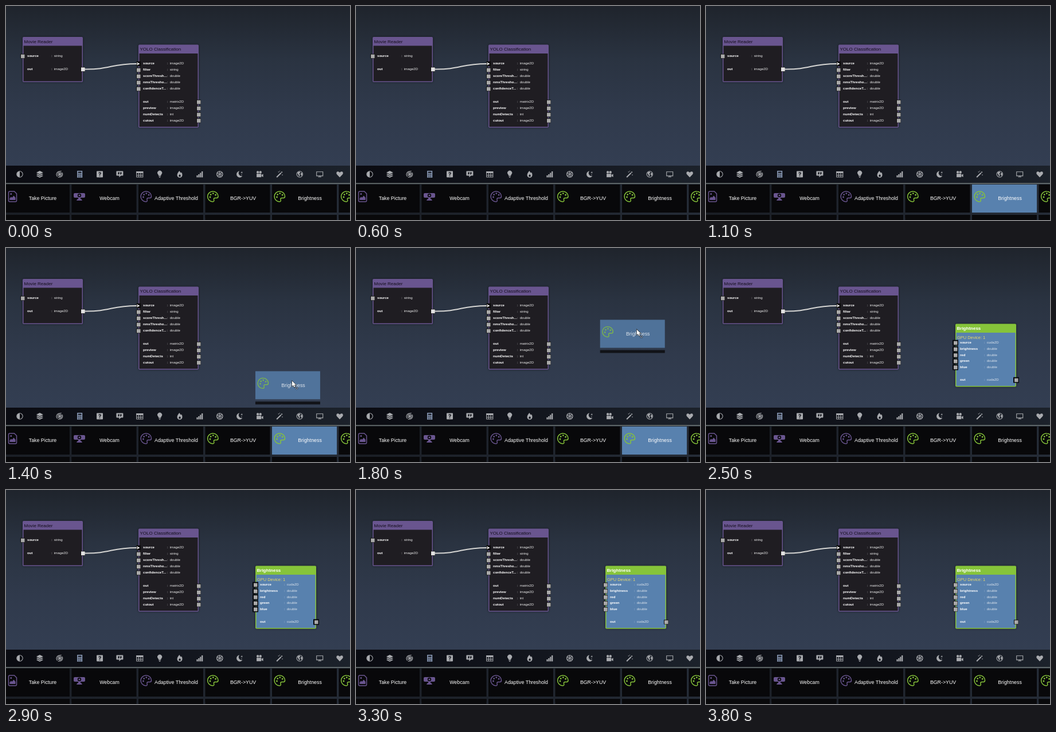
An HTML page with a canvas for the animation above (3900 ms loop, 600 px wide and 374 px high).

```html
<!DOCTYPE html>
<html>
<head>
<meta charset="utf-8">
<style>
html, body { margin: 0; width: 100%; height: 100%; overflow: hidden; background: #1d232c; }
canvas { display: block; }
</style>
</head>
<body>
<canvas id="stage" width="600" height="374"></canvas>
<script>
const ctx = document.getElementById('stage').getContext('2d');
const LOOP = 3900, GRAB = 1100, DRAG = 1200, DROP = 2400, DESELECT = 3300;
const PURPLE = '#69558f', GREEN = '#86c43a', BLUE = '#5881ae';

const dot = (x, y, r) => `M${x - r} ${y}a${r} ${r} 0 1 0 ${2 * r} 0a${r} ${r} 0 1 0 ${-2 * r} 0z`;
const box = (x, y, w, h) => `M${x} ${y}h${w}v${h}h${-w}z`;
const grid = (xs, ys, s) => xs.map(x => ys.map(y => box(x, y, s, s)).join('')).join('');

// Toolbar icons: [filled path, stroked path], centred on 0,0
const toolbar = [
  ['M0-5A5 5 0 0 0 0 5z', dot(0, 0, 5.2)],
  ['M0-6L6-3L0 0L-6-3zM-6 0L-4-1L0 1L4-1L6 0L0 3zM-6 3L-4 2L0 4L4 2L6 3L0 6z', ''],
  [dot(0, 0, 2), 'M-4 4A5 5 0 0 1-2-4.6L3-5.5M4-3A5 5 0 0 1 2 4.6L-3 5.5' + dot(0, 0, 3.2)],
  [box(-4.5, -6, 9, 12) + box(-3, -4.5, 6, 2.2) + grid([-3, -.8, 1.4], [-1, 1.4, 3.8], 1.4), ''],
  ['M-4.5-5.5h9q1 0 1 1v9q0 1-1 1h-9q-1 0-1-1v-9q0-1 1-1z' +
    'M-2.2-1.5Q-2-3.8 0-3.8Q2.4-3.8 2.4-1.8Q2.4-.6.7.4V1.4H-.7V-.3Q1-1 1-1.8Q1-2.6 0-2.6Q-.8-2.6-.9-1.5z' + box(-.7, 2.4, 1.4, 1.4), ''],
  ['M-5-5.5h10q1 0 1 1v6q0 1-1 1h-3L-1 5.5V2.5h-4q-1 0-1-1v-6q0-1 1-1zM-3-3.5h2.4v2.5L-2 .5h-1zM.8-3.5h2.4v2.5L1.8.5h-1z', ''],
  [box(-6, -5, 12, 3), box(-5.5, -4.5, 11, 9.5) + 'M-5 1.7H5M-1.8-2V5M1.8-2V5'],
  ['M-2 2.7Q-2 1.5-3 .3A4 4 0 1 1 3 .3Q2 1.5 2 2.7z' + box(-1.8, 3.4, 3.6, 1) + 'M-1.4 4.9h2.8L.6 6h-1.2z', ''],
  ['M-.5-6Q.5-3.5 2-2.2L3-3.5Q4.7-1 4.5 1.5A4.5 4.5 0 0 1-4.5 1.5Q-4.5-2-.5-6zM0 0Q-2 2-1.8 3.2A1.9 1.9 0 0 0 1.8 3.2Q2 2 0 0z', ''],
  [box(-5.5, 2, 2.2, 3.5) + box(-2.6, 0, 2.2, 5.5) + box(.3, -2.5, 2.2, 8) + box(3.2, -5, 2.2, 10.5), ''],
  [dot(0, 0, 1.2), dot(0, 0, 5.3) + [0, 1, 2, 3, 4, 5].map(i => {
    const p = (r, a) => `${(r * Math.cos(a)).toFixed(2)} ${(r * Math.sin(a)).toFixed(2)}`;
    return `M${p(1.2, i * 1.047)}Q${p(3.5, i * 1.047 - .3)} ${p(5.2, i * 1.047 + .7)}`;
  }).join('')],
  ['M-.5-5.5A5.6 5.6 0 1 0 4.8 3A5.2 5.2 0 0 1-.5-5.5zM3.5-5l.6 1.4 1.4.6-1.4.6-.6 1.4-.6-1.4-1.4-.6 1.4-.6z' + dot(3.2, 1, .7), ''],
  [dot(-3.4, -3.6, 2.2) + dot(1.2, -3.6, 2.2) + box(-5.5, -.8, 8.2, 6) + 'M3.3 1L6-.6V5L3.3 3.4z', ''],
  ['M-6 4.6L1.6-3L3-1.6L-4.6 6zM2.2-3.6L3.6-5L5-3.6L3.6-2.2z' + dot(-2, -4, .8) + dot(4.6, 1.2, .8) + dot(0, -5.3, .6), ''],
  ['M-4-2Q-2.5-5 0-4.6L1-3L-1-1L.5.5L-.5 4Q-2 3-2.2 1zM2-2.5L4.3-2Q5.2 1 3 3L1.6.3z', dot(0, 0, 5.2)],
  [box(-2.5, 4, 5, 1.2) + box(-.8, 3, 1.6, 1.5), box(-5.5, -4.3, 11, 7.2)],
  ['M0 5.4L-5.2 0Q-6.6-2-5-4.2Q-2.5-6 0-3Q2.5-6 5-4.2Q6.6-2 5.2 0z', '']
];

const palette = [dot(-5, 1, 1.4) + dot(-3.8, -3.4, 1.4) + dot(.3, -5.4, 1.4) + dot(4.6, -2.8, 1.4),
  'M0-9A9 9 0 1 0-.8 9Q2.6 9 1.6 5.6Q.6 2.6 4 2.4L7 2.5Q9 2.2 9-.2A9 9 0 0 0 0-9z'];
const picture = ['M-5 6V3L-2.5 .5L-1 2L2 -1.5L5 2V6z' + dot(-2.7, -4.5, 1.5),
  'M-5-9H3L7-5V7Q7 9 5 9H-5Q-7 9-7 7V-7Q-7-9-5-9z'];
const webcam = ['M-8-6H8Q10-6 10-4V0Q10 2 8 2H-8Q-10 2-10 0V-4Q-10-6-8-6zM-5 7Q-4 4-2 4V2H2V4Q4 4 5 7z' + dot(0, -2, 3.2) + dot(0, -2, 1.5), ''];

const tiles = [
  ['Take Picture', picture, PURPLE], ['Webcam', webcam, PURPLE], ['Adaptive Threshold', palette, PURPLE],
  ['BGR->YUV', palette, GREEN], ['Brightness', palette, GREEN], ['', palette, GREEN]
];
const tileX = i => -2 + 116.5 * i;

function rect(x, y, w, h, fill) {
  ctx.fillStyle = fill;
  ctx.fillRect(x, y, w, h);
}

function gradient(x, y, w, h, x2, y2, ...colors) {
  const g = ctx.createLinearGradient(x, y, x2, y2);
  colors.forEach((c, i) => g.addColorStop(i / (colors.length - 1), c));
  rect(x, y, w, h, g);
}

function text(str, x, y, size, color, weight = 'normal', align = 'left') {
  ctx.font = `${weight} ${size}px "Liberation Sans", Arial, sans-serif`;
  ctx.textAlign = align;
  ctx.fillStyle = color;
  ctx.fillText(str, x, y);
}

function icon([fill, stroke], x, y, color, width = 1) {
  ctx.save();
  ctx.translate(x, y);
  ctx.fillStyle = ctx.strokeStyle = color;
  ctx.lineWidth = width;
  ctx.fill(new Path2D(fill), 'evenodd');
  ctx.stroke(new Path2D(stroke));
  ctx.restore();
}

function tile([label, art, color], x, y, fill) {
  rect(x, y, 113, 49, fill);
  rect(x, y + 53, 113, 5, '#09090b');
  icon(art, x + 13.5, y + 21, color, 1.5);
  text(label, x + 66, y + 27.2, 8.8, '#fff', 'normal', 'center');
}

function port(x, y, selected) {
  rect(x - 4, y - 4, 8, 8, '#111');
  if (selected) rect(x - 5, y - 5, 10, 10, '#06080c');
  rect(x - 3, y - 3, 6.5, 6.5, '#aaa');
}

// rows: [name, type, y, side], side 0 = input, 1 = output
function node(x, y, w, h, title, rows, style) {
  ctx.save();
  ctx.shadowColor = 'rgba(0,0,0,.45)';
  ctx.shadowBlur = 4;
  ctx.beginPath();
  ctx.roundRect(x, y, w, h, 2);
  ctx.fillStyle = style.accent;
  ctx.fill();
  ctx.restore();
  rect(x + 1.5, y + 15.5, w - 3, h - 17, style.body);
  text(title, x + 2.5, y + 10.8, 8, style.title, style.weight);
  for (const [name, type, rowY, side] of rows) {
    port(x + side * w, rowY + .7, style.selected);
    text(name, x + 8, rowY + 2, 6.1, '#fff', 'bold');
    text(':', x + 50, rowY + 2, 6.1, style.type);
    text(type, x + 54.7, rowY + 2, 6.1, style.type);
  }
}

const dark = { accent: PURPLE, body: '#1f1d22', title: '#120d1a', type: '#eee' };

function drawGraph() {
  node(29, 54, 105, 79, 'Movie Reader', [['source', 'string', 87, 0], ['out', 'image2D', 110, 1]], dark);
  node(231, 67.5, 105, 145, 'YOLO Classification', [
    ['source', 'image2D', 100, 0], ['filter', 'string', 111, 0], ['scoreThresh...', 'double', 122, 0],
    ['nmsThresho...', 'double', 133, 0], ['confidenceT...', 'double', 144, 0],
    ['out', 'matrix2D', 167, 1], ['preview', 'image2D', 178, 1], ['numDetects', 'int', 189, 1], ['cutout', 'image2D', 199.5, 1]
  ], dark);
  rect(131, 107.5, 6.5, 6.5, '#e2e2e2');
  rect(227, 97, 8, 8, '#0a0a0a');
  ctx.strokeStyle = '#d6d6d4';
  ctx.lineWidth = 2;
  ctx.stroke(new Path2D('M137 110.5C183 111 182 101 228 101'));
  icon(['M-3-3L3 0L-3 3L-1 0z', ''], 230.5, 101, '#fff');
}

function drawShelf(held) {
  gradient(0, 279, 600, 31, 600, 310, '#0a0b11', '#12151d', '#1c222b');
  toolbar.forEach((art, i) => icon(art, 24 + 34.88 * i, 294, i === 3 ? '#8fa0bd' : '#a9abaf', 1.1));
  gradient(0, 310, 600, 64, 600, 310, '#1a1e25', '#252c37');
  rect(0, 309.5, 600, 1.2, '#858f8c');
  tiles.forEach((t, i) => {
    tile(t, tileX(i), 312, held && i === 4 ? BLUE : '#08080a');
    rect(tileX(i), 365, 113, 9, '#09090b');
  });
}

function drawDrag(t) {
  const u = Math.max(0, Math.min(1, (t - 1126) / 830));
  const rise = Math.sin(u * Math.PI / 2);
  const x = tileX(4) - 39 * rise ** .42, y = 312 - 195 * rise;
  ctx.globalAlpha = .8;
  tile(tiles[4], x, y, BLUE);
  ctx.globalAlpha = 1;
  const cursor = 'M0 0V9.5L2.2 7.5L3.8 11L5.4 10.3L3.9 7H7z';
  icon([cursor, cursor], x + 64, y + 17, '#222', 1.2);
  icon([cursor, ''], x + 64, y + 17, '#fff');
  icon([dot(0, 0, 2.6), ''], x + 72, y + 29.5, '#253346');
  icon(['', dot(0, 0, 1.7)], x + 72, y + 29.5, '#b8c6d4', .8);
}

function drawDropped(selected) {
  node(435, 132.5, 106, 110, 'Brightness', [
    ['source', 'cuda2D', 165, 0], ['brightness', 'double', 176, 0], ['red', 'double', 186.5, 0],
    ['green', 'double', 197, 0], ['blue', 'double', 207.7, 0], ['out', 'cuda2D', 230, 1]
  ], { accent: GREEN, body: BLUE, title: '#fff', weight: 'bold', type: '#dbe3ec', selected });
  text('GPU Device: 1', 438, 158.5, 7.45, '#ecd967');
}

function frame(now) {
  const t = Math.floor(now % LOOP / 100) * 100;
  gradient(0, 0, 600, 279, 0, 279, '#1f242c', '#2a3341', '#303a4c', '#333e52');
  drawGraph();
  if (t >= DROP) drawDropped(t < DESELECT);
  drawShelf(t >= GRAB && t < DROP);
  if (t >= DRAG && t < DROP) drawDrag(t);
  requestAnimationFrame(frame);
}

const start = performance.now();
requestAnimationFrame(() => frame(0));
function loop() {}
</script>
</body>
</html>
```
